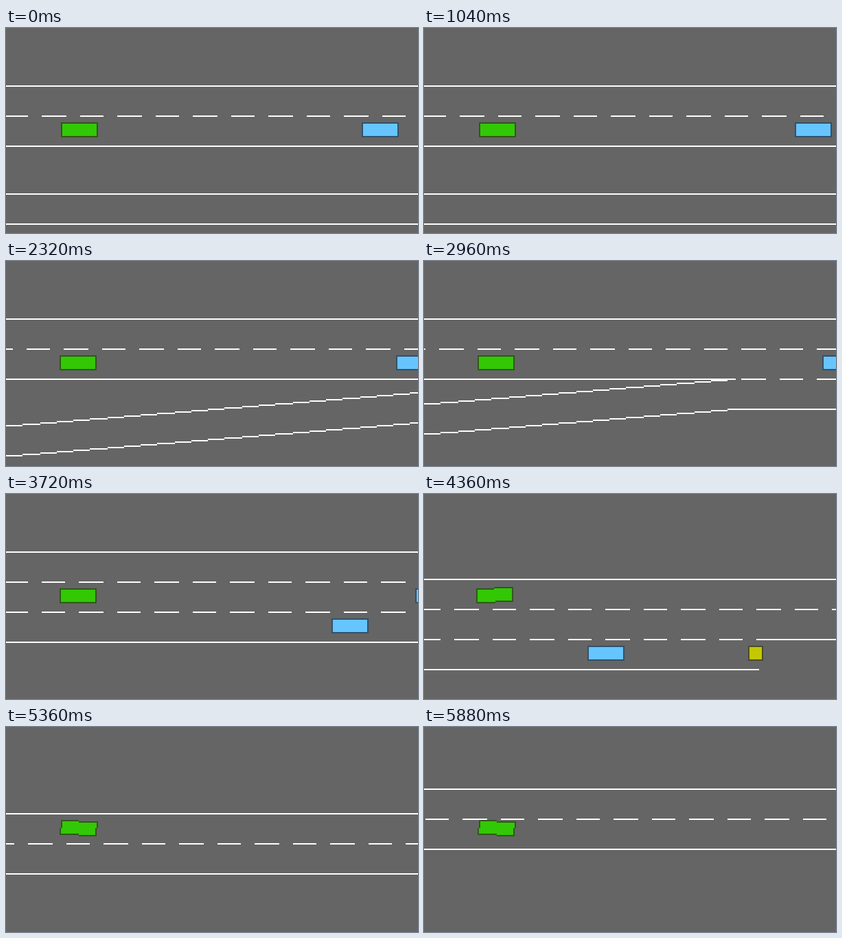
Write an HTML page with a canvas that moves like this. It is 600 px wide and 300 px high and loops after 5.92 s.

```html
<!DOCTYPE html>
<html lang="en">
<head>
<meta charset="utf-8">
<title>Highway merge</title>
<style>
  html, body { margin: 0; width: 100%; height: 100%; overflow: hidden; background: #656565; }
  canvas { display: block; width: 600px; height: 300px; }
</style>
</head>
<body>
<canvas id="road" width="600" height="300"></canvas>
<script>
const ctx = document.getElementById('road').getContext('2d');
const W = 600, H = 300, LOOP = 5920, STEP = 40, PX = 2;

// Road landmarks, in pixels travelled from the start.
const LANE = 44, DASH = 35, PERIOD = 55;
const BEND = 1439, SLOPE = 0.0815, RISE = 70;
const MERGE = BEND + RISE / SLOPE, LANE_END = 3187.5;

// Key points of [time in ms, value].
const travel = [[0, 0], [1040, 660], [2320, 1452.3], [3720, 2310.3],
  [4360, 2703], [5360, 3320], [LOOP, 3649]];
const greenX = [[0, 107], [3720, 104.2], [4360, 103], [5360, 106]];

const GREEN = ['#33c805', '#30571b'];
const BLUE = ['#66c5ff', '#345069'];
const YELLOW = ['#c3c800', '#4a4d28'];

const snap = v => PX * Math.round(v / PX);
const clamp = (v, lo, hi) => Math.min(hi, Math.max(lo, v));
const quarter = (t, start, span) => clamp((t - start) / span, 0, 1) * Math.PI / 2;

function at(keys, t) {
  const i = keys.findIndex(([time]) => time > t);
  if (i < 0) return keys[keys.length - 1][1];
  const [t0, a] = keys[i - 1], [t1, b] = keys[i];
  return a + (b - a) * (t - t0) / (t1 - t0);
}

// The view follows the green car out to the next lane and back.
const pan = t => 46 * Math.sin(quarter(t, 3720, 930)) * Math.cos(quarter(t, 5146, 800));
const tilt = t => clamp((pan(t - STEP) - pan(t)) * 0.028, -0.07, 0.07);
const leaderX = t => 518 + t * 0.02115;
const mergerX = t => 474 - (t - 3720) * 0.36875;

function line(x0, x1, y) {
  const a = Math.max(0, snap(x0)), b = Math.min(W, snap(x1));
  if (b > a) ctx.fillRect(a, y, b - a, PX);
}

function dashes(x0, x1, y, dist) {
  const first = (52 - dist % PERIOD) % PERIOD - PERIOD;
  for (let x = first; x < W; x += PERIOD) {
    line(Math.max(x, x0), Math.min(x + DASH, x1), y);
  }
}

function ramp(y, dist, shift, end) {
  for (let x = 0; x < Math.min(W, end); x += PX) {
    const rise = clamp((x + dist - BEND) * SLOPE, 0, RISE);
    ctx.fillRect(x, snap(y - rise) + shift, PX, PX);
  }
}

function box(x, y, w, [fill, edge]) {
  const h = 22;
  x = snap(x);
  ctx.fillStyle = edge;
  ctx.fillRect(x, y, w, h);
  ctx.fillStyle = fill;
  ctx.fillRect(x + PX, y + PX, w - 2 * PX, h - 2 * PX);
}

// A tilted car, filled cell by cell to keep its hard stepped edges.
function tiltedCar(cx, cy, slope, [fill, edge]) {
  const angle = Math.atan(slope), c = Math.cos(angle), s = Math.sin(angle);
  const within = (v, half) => v >= -half && v < half;
  const left = snap(cx) - 34, top = snap(cy) - 20;
  for (let y = top; y < top + 40; y += PX) {
    for (let x = left; x < left + 68; x += PX) {
      const dx = x + 1 - cx, dy = y + 1 - cy;
      const u = dx * c + dy * s, v = dy * c - dx * s;
      if (!within(u, 27) || !within(v, 11)) continue;
      ctx.fillStyle = within(u, 25) && within(v, 9) ? fill : edge;
      ctx.fillRect(x, y, PX, PX);
    }
  }
}

function draw(t) {
  const dist = at(travel, t), shift = snap(pan(t));
  const merge = MERGE - dist, end = LANE_END - dist;
  const top = 84 + shift, middle = top + LANE, bottom = middle + LANE;

  ctx.fillStyle = '#656565';
  ctx.fillRect(0, 0, W, H);

  ctx.fillStyle = '#fff';
  line(0, W, top);
  dashes(-PERIOD, W, middle, dist);
  line(0, merge, bottom);
  dashes(merge, end, bottom, dist);
  line(end, W, bottom);
  ramp(242, dist, shift, merge);
  ramp(242 + LANE, dist, shift, end + PX);

  box(end - 13, bottom + 10, 22, YELLOW);
  box(leaderX(t), middle + 10, 54, BLUE);
  box(mergerX(t), bottom + 10, 54, BLUE);
  tiltedCar(at(greenX, t), 149 - Math.min(1, pan(t) / 5), tilt(t), GREEN);
}

const start = performance.now();
function tick() {
  const t = Math.max(0, performance.now() - start) % LOOP;
  draw(Math.floor(t / STEP) * STEP);
  requestAnimationFrame(tick);
}
tick();
</script>
</body>
</html>
```
